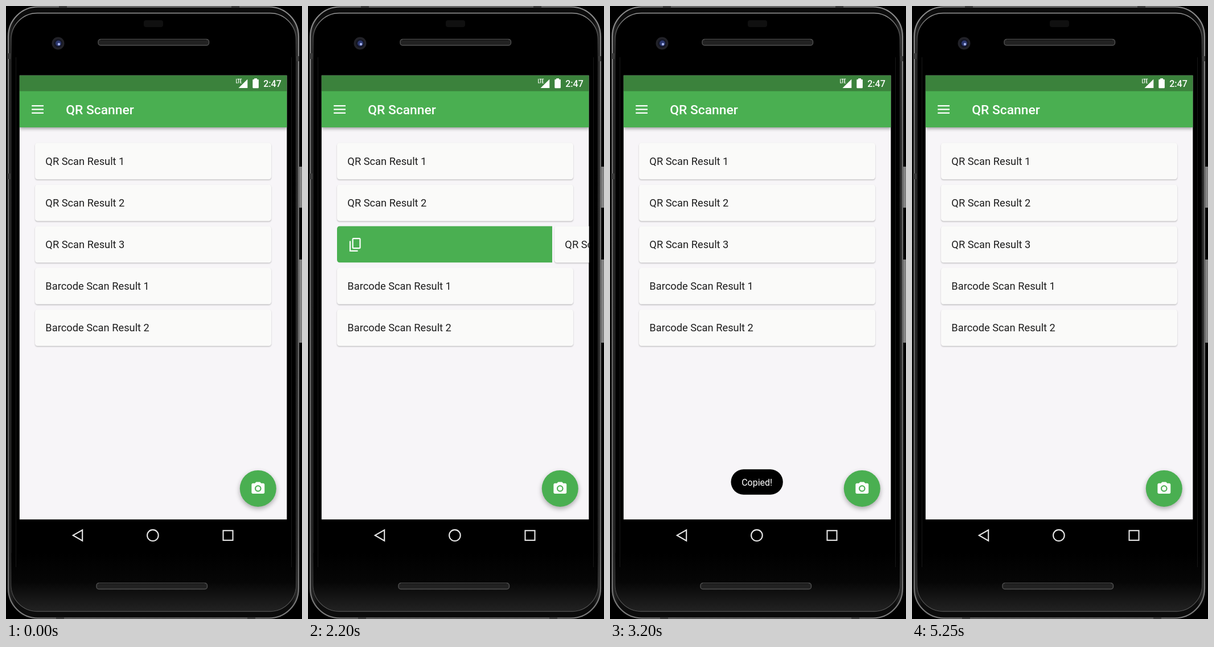
Recreate the animation shown at these times as an HTML page with a canvas. Size 520 px wide and 1076 px high, loop 5300 ms.

```html
<!DOCTYPE html>
<html lang="en">
<head>
<meta charset="utf-8">
<title>Scan list</title>
<style>
html, body { margin: 0; width: 100%; height: 100%; overflow: hidden; background: #000; }
canvas { display: block; width: 520px; height: 1076px; }
</style>
</head>
<body>
<canvas id="stage"></canvas>
<script>
const W = 520, H = 1076, LOOP = 5300;
const GREEN = '#4aaf51', DARK_GREEN = '#3b823c', WHITE = '#fcfefc', CARD = '#fafaf9', PAGE = '#f7f5f8';
const SCREEN = { x: 23.6, y: 121.6, w: 470, h: 779.9 };
const LABELS = ['QR Scan Result 1', 'QR Scan Result 2', 'QR Scan Result 3',
  'Barcode Scan Result 1', 'Barcode Scan Result 2'];
const SWIPED = 2, FULL = 423;
// [time, offset] of the swiped card: drag, hold, spring back
const SWIPE = [[1650, 0], [1850, 60], [2050, 180], [2200, 382], [2222, FULL], [2700, FULL], [2900, 0]];
const TOAST = [[2569, 0], [2919, 1], [4509, 1], [4859, 0]];
const CAMERA = new Path2D('M9 2L7.17 4H4c-1.1 0-2 .9-2 2v12c0 1.1.9 2 2 2h16c1.1 0 2-.9 2-2V6' +
  'c0-1.1-.9-2-2-2h-3.17L15 2H9zm3 15c-2.76 0-5-2.24-5-5s2.24-5 5-5 5 2.24 5 5-2.24 5-5 5z' +
  'M15.2 12a3.2 3.2 0 1 1-6.4 0a3.2 3.2 0 1 1 6.4 0z');

const canvas = document.getElementById('stage');
const dpr = window.devicePixelRatio || 1;
canvas.width = W * dpr;
canvas.height = H * dpr;
const screenCtx = canvas.getContext('2d');
let ctx = screenCtx;

function track(keys, t) {
  if (t <= keys[0][0]) return keys[0][1];
  for (let i = 1; i < keys.length; i++) {
    const [t0, a] = keys[i - 1], [t1, b] = keys[i];
    if (t < t1) return a + (b - a) * (t - t0) / (t1 - t0);
  }
  return keys[keys.length - 1][1];
}

function round(x, y, w, h, r, fill, stroke, lw = 1) {
  ctx.beginPath();
  ctx.roundRect(x, y, w, h, r);
  if (fill) { ctx.fillStyle = fill; ctx.fill(); }
  if (stroke) { ctx.strokeStyle = stroke; ctx.lineWidth = lw; ctx.stroke(); }
}

function rect(x, y, w, h, fill) {
  ctx.fillStyle = fill;
  ctx.fillRect(x, y, w, h);
}

function disc(x, y, r, fill) {
  ctx.beginPath();
  ctx.arc(x, y, r, 0, Math.PI * 2);
  ctx.fillStyle = fill;
  ctx.fill();
}

function path(points, closed) {
  ctx.beginPath();
  points.forEach(([x, y]) => ctx.lineTo(x, y));
  if (closed) ctx.closePath();
}

function line(points, color, lw, closed) {
  path(points, closed);
  ctx.strokeStyle = color;
  ctx.lineWidth = lw;
  ctx.stroke();
}

function text(str, x, y, size, color, weight = 400, align = 'left') {
  ctx.font = `${weight} ${size}px Roboto, sans-serif`;
  ctx.textAlign = align;
  ctx.fillStyle = color;
  ctx.fillText(str, x, y);
}

function blend(x0, y0, x1, y1, stops) {
  const g = ctx.createLinearGradient(x0, y0, x1, y1);
  stops.forEach(([at, color]) => g.addColorStop(at, color));
  return g;
}

function shadowed(color, blur, dy, draw) {
  ctx.save();
  ctx.shadowColor = color;
  ctx.shadowBlur = blur * dpr;
  ctx.shadowOffsetY = dy * dpr;
  draw();
  ctx.restore();
}

function drawPhone() {
  rect(0, 0, W, H, '#000');
  // side keys
  for (const [y, h] of [[282, 72], [445, 146]]) {
    round(513.5, y, 9, h, 2, blend(514, 0, 520, 0, [[0, '#444'], [0.45, '#8c8c8c'], [1, '#777']]));
  }
  // metal rim
  round(4, 1.5, 510, 1073, 52,
    blend(4, 0, 514, 0, [[0, '#2c2c2c'], [0.025, '#0c0c0c'], [0.975, '#0c0c0c'], [1, '#333']]),
    blend(0, 0, 0, H, [[0, '#8c8c8c'], [0.06, '#858585'], [0.2, '#6e6e6e'], [0.85, '#626262'], [1, '#7c7c7c']]), 2.2);
  for (const y of [88, 299]) rect(2, y - 5, 6, 10, '#3a3a3a');
  rect(509, 88, 6, 9, '#3a3a3a');
  for (const x of [93, 396]) rect(x, 0, 14, 3, '#3a3a3a');
  for (const x of [88, 424]) rect(x, 1073, 14, 3, '#3a3a3a');
  // front glass
  round(9, 12.5, 500.5, 1050, 46, '#000',
    blend(0, 12, 0, 1062, [[0, '#9a9a9a'], [0.03, '#555'], [0.08, '#262626'], [0.9, '#202020'], [1, '#555']]), 1.5);
  ctx.save();
  ctx.beginPath();
  ctx.roundRect(9.5, 13, 499.5, 1049, 46);
  ctx.clip();
  rect(9, 960, 501, 102, blend(0, 960, 0, 1062, [[0, '#000'], [0.5, '#060606'], [1, '#222']]));
  ctx.restore();
  line([[17.5, 90], [17.5, 985]], '#181818', 1);
  line([[501.5, 90], [501.5, 985]], '#181818', 1);
  // sensor, camera, speakers
  round(242, 25, 34, 12, 4, '#101010');
  disc(91.5, 65.5, 11, '#222228');
  disc(91.5, 65.5, 7.5, '#141624');
  disc(92, 65.5, 5, '#2c3870');
  disc(93, 67, 2.2, '#a9b6ee');
  for (const [x, y] of [[162, 58.5], [159, 1013]]) {
    round(x, y, 194.5, 10.5, 4, '#222', '#505050', 1.4);
    line([[x + 4, y + 1], [x + 190, y + 1]], '#0c0c0c', 1.2);
  }
  // navigation keys
  line([[117.8, 929.2], [134.2, 919.8], [134.2, 938.6]], '#e8e8e8', 2.1, true);
  ctx.beginPath();
  ctx.arc(257.9, 929.2, 9.8, 0, Math.PI * 2);
  ctx.stroke();
  ctx.strokeRect(381.5, 920.8, 17, 17);
}

function drawCard(x, y, label) {
  shadowed('rgba(0,0,0,.24)', 2.2, 1.3, () => round(x, y, 415, 64, 4.5, CARD));
  text(label, x + 18.3, y + 38.5, 18.29, '#1e1e1e');
}

function drawSwipeBack(y, offset) {
  ctx.save();
  ctx.beginPath();
  ctx.rect(47, y - 4, offset, 72);
  ctx.clip();
  round(51, y, 415, 63.8, 4.5, GREEN);
  round(78.6, y + 21.6, 12.9, 17, 1.2, null, WHITE, 2.2);
  line([[74, y + 26], [74, y + 43.3], [87.5, y + 43.3]], WHITE, 2.2);
  ctx.restore();
}

function drawStatus() {
  path([[408.5, 144], [424.3, 128.4], [424.3, 144]], true);
  ctx.fillStyle = WHITE;
  ctx.fill();
  // network letters
  line([[404.8, 127.8], [404.8, 135], [407.2, 135]], WHITE, 1.1);
  line([[406.6, 128.4], [410.4, 128.4]], WHITE, 1.1);
  line([[408.5, 128.4], [408.5, 135.5]], WHITE, 1.1);
  line([[414.2, 128.4], [411.6, 128.4], [411.6, 135], [414.2, 135]], WHITE, 1.1);
  line([[411.6, 131.7], [413.8, 131.7]], WHITE, 1.1);
  // battery and clock
  round(433.3, 128.8, 10.6, 15.4, 1.2, WHITE);
  rect(436.2, 127, 4.8, 2.5, WHITE);
  text('2:47', 483.8, 141.8, 16, WHITE, 500, 'right');
}

function drawBar() {
  shadowed('rgba(0,0,0,.4)', 6, 2, () => rect(SCREEN.x, 149, SCREEN.w, 64, GREEN));
  rect(SCREEN.x, SCREEN.y, SCREEN.w, 149.5 - SCREEN.y, DARK_GREEN);
  for (const y of [175.2, 181.5, 187.8]) rect(45.2, y - 1.15, 20.8, 2.3, WHITE);
  text('QR Scanner', 105.2, 190.2, 22.86, WHITE, 500);
  drawStatus();
}

function drawFab() {
  shadowed('rgba(0,0,0,.32)', 8, 3.5, () => disc(442.8, 846.9, 32, GREEN));
  ctx.save();
  ctx.translate(442.8 - 13.7, 846.9 - 13.7);
  ctx.scale(1.143, 1.143);
  ctx.fillStyle = WHITE;
  ctx.fill(CAMERA, 'evenodd');
  ctx.restore();
}

function drawToast(alpha) {
  if (!alpha) return;
  ctx.save();
  ctx.globalAlpha = alpha;
  round(212.5, 813.3, 91.3, 44.5, 22.2, '#000');
  text('Copied!', 258.2, 841.8, 16, '#fff', 400, 'center');
  ctx.restore();
}

function drawScreen(t) {
  ctx.save();
  ctx.beginPath();
  ctx.rect(SCREEN.x, SCREEN.y, SCREEN.w, SCREEN.h);
  ctx.clip();
  rect(SCREEN.x, SCREEN.y, SCREEN.w, SCREEN.h, PAGE);
  const offset = track(SWIPE, t);
  LABELS.forEach((label, i) => {
    const y = 240.3 + i * 73.1, dx = i === SWIPED ? offset : 0;
    if (dx) drawSwipeBack(y, dx);
    drawCard(51 + dx, y, label);
  });
  drawBar();
  drawFab();
  drawToast(track(TOAST, t));
  ctx.restore();
}

// the phone never changes, so paint it once
const phone = document.createElement('canvas');
phone.width = canvas.width;
phone.height = canvas.height;
ctx = phone.getContext('2d');
ctx.scale(dpr, dpr);
drawPhone();
ctx = screenCtx;
ctx.scale(dpr, dpr);

const start = performance.now();
function frame() {
  const t = (performance.now() - start) % LOOP;
  ctx.drawImage(phone, 0, 0, W, H);
  drawScreen(Math.floor(t / 50) * 50);
  requestAnimationFrame(frame);
}
frame();
</script>
</body>
</html>
```
